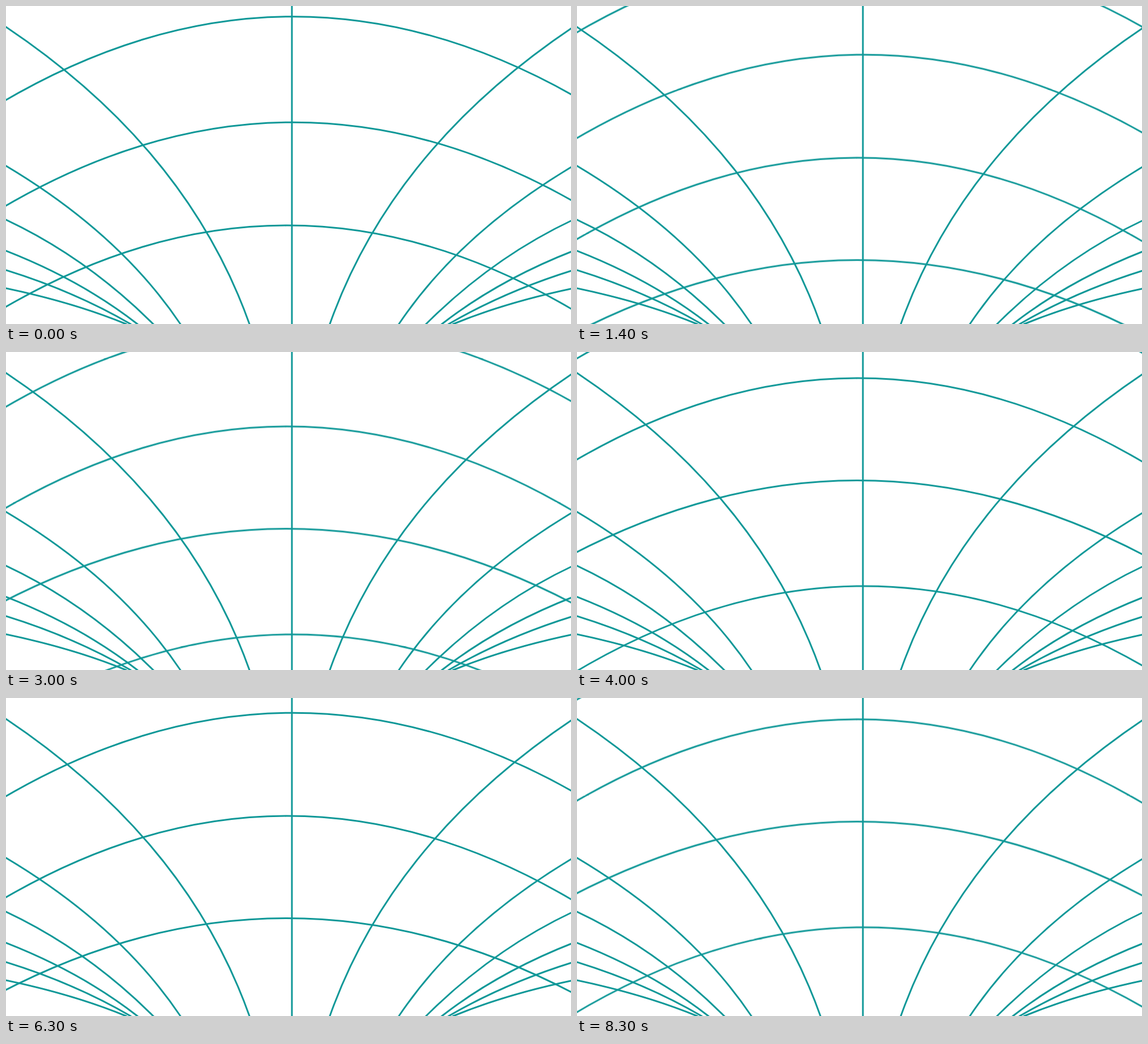
An HTML page for the animation above (8400 ms loop, 998x561 px).

```html
<!DOCTYPE html>
<html lang="en">
<head>
<meta charset="utf-8">
<title>Curved grid</title>
<style>
  html, body { margin: 0; width: 100%; height: 100%; overflow: hidden; background: #fff; }
  svg { display: block; width: 100%; height: 100%; }
  path { fill: none; stroke: #109898; stroke-width: 3; stroke-linecap: square; }
  /* The small negative delay keeps each step clear of its boundary. */
  #arcs { animation: rise 4200ms steps(42) -10ms infinite; }
  @keyframes rise { to { transform: translateY(-358px); } }
</style>
</head>
<body>
<svg viewBox="0 0 998 561">
  <g id="arcs"></g>
  <path d="M505 0V561"/>
  <g id="fan">
    <path d="M0 37Q319.5 251 430 561"/>
    <path d="M0 282Q200 401 308 561"/>
    <path d="M0 377Q142.5 444 260 561"/>
    <path d="M0 432Q133 484 232 561"/>
    <path d="M0 466Q120.7 503.4 220 561"/>
    <path d="M0 498Q120 523.2 212 561"/>
  </g>
  <use href="#fan" transform="translate(1002 0) scale(-1 1)"/>
</svg>
<script>
  // Each arc is a parabola: apex x, apex y, curvature.
  const arcs = [
    [507.8, 18.7, 5.7e-4],
    [507.8, 205.2, 5.7e-4],
    [496, 387.1, 5.83e-4],
    [495.3, 567.6, 5.14e-4],
    [507.5, 753.9, 5.81e-4]
  ];
  const left = -10, right = 1008, mid = (left + right) / 2;

  function parabola([cx, cy, k]) {
    const y = x => cy + k * (x - cx) ** 2;
    const controlY = y(left) + 2 * k * (left - cx) * (mid - left);
    return `M${left} ${y(left)}Q${mid} ${controlY} ${right} ${y(right)}`;
  }

  for (const arc of arcs) {
    const path = document.createElementNS("http://www.w3.org/2000/svg", "path");
    path.setAttribute("d", parabola(arc));
    document.getElementById("arcs").append(path);
  }
</script>
</body>
</html>
```
